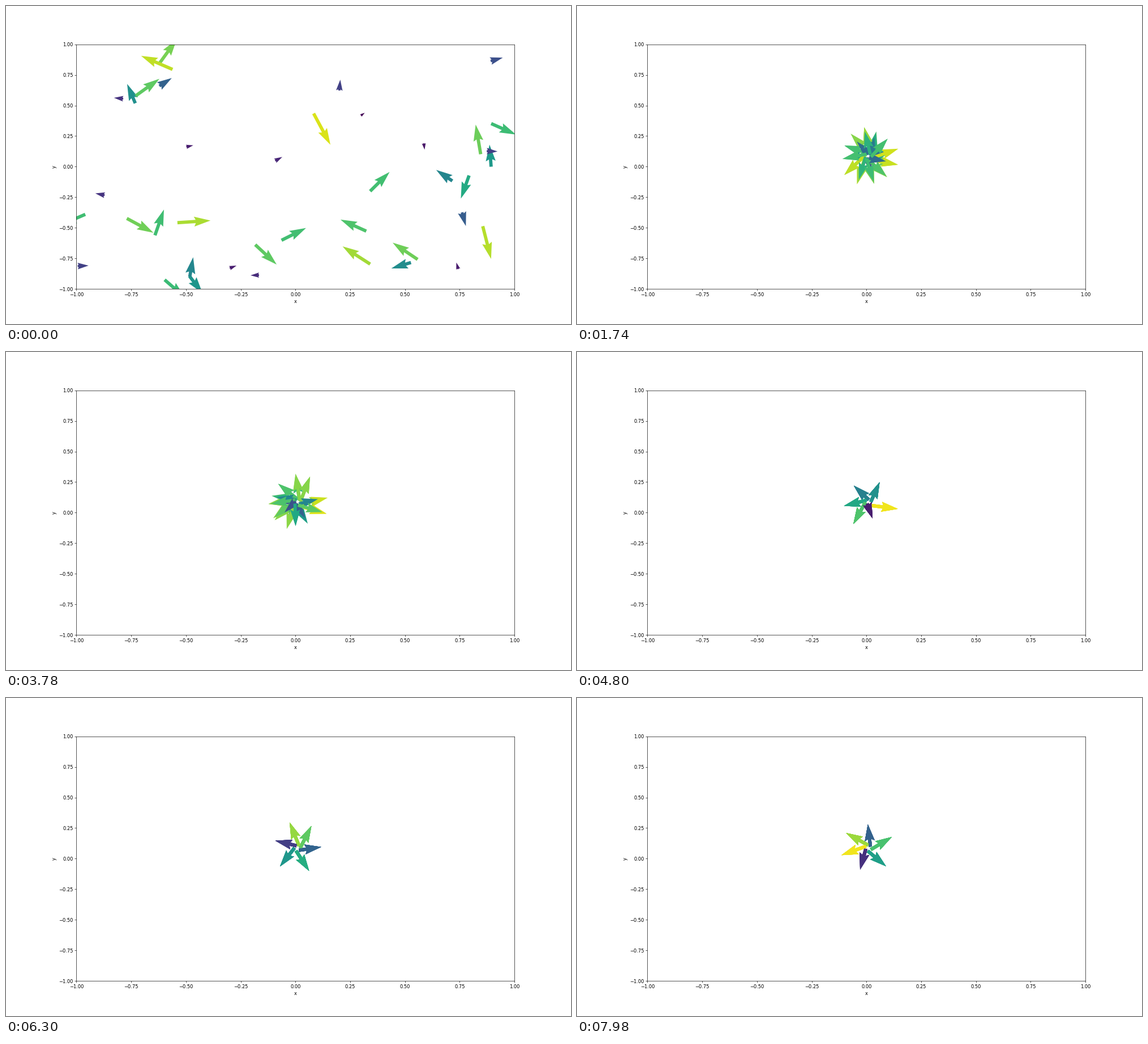
Write a matplotlib script that moves like this. It is 998 by 561 pixels and loops after 8000 ms.

```python
import numpy as np
import matplotlib.pyplot as plt
from matplotlib.animation import FuncAnimation

W, H, DPI = 998, 561, 60
LEFT, RIGHT, TOP, BOTTOM = 124.4, 898.2, 67.6, 499.3
AX_W, AX_H = RIGHT - LEFT, BOTTOM - TOP
CX, CY = 514.5, 265.0            # point the swarm circles around
N, ARMS = 40, 6
ARM = 2 * np.pi / ARMS           # spacing of the arms and turn per step
GATHER = 13                      # steps needed to reach the centre

# step: (drift, wobble, wobble phase) in degrees, shade of each arm
POSES = {
    29: ((-5, 4, 90), (.93, .70, .85, .70, .90, .80)),
    42: ((4, 10, -40), (.65, .75, .88, .88, .93, .94)),
    63: ((6, 25, -30), (.95, .82, .72, .83, .83, .60)),
    80: ((-2, 14, -50), (.98, .50, .43, .60, .72, .08)),
    105: ((-8, 11, 90), (.32, .75, .84, .18, .53, .62)),
    133: ((20, 11, 30), (.71, .31, .85, .98, .14, .56)),
}
steps = list(POSES)
bends = np.radians([bend for bend, _ in POSES.values()])
shades = np.array([np.roll(s, -k) for k, (_, s) in POSES.items()])

rng = np.random.default_rng(12)
tails = (rng.uniform(LEFT, RIGHT, N) - CX
         + 1j * (CY - rng.uniform(TOP, BOTTOM, N)))
speed = rng.uniform(8, 66, N)
first_arrow = speed * np.exp(2j * np.pi * rng.random(N))
first_shade = (speed - 8) / 58

index = np.arange(N)
arm = index % ARMS
side = np.where(index // ARMS % 2, 1, -1)
slow = rng.random(N) ** 4


def between(n, columns):
    return np.array([np.interp(n, steps, c) for c in columns.T])


def orbit(n):
    """Tail, arrow and shade of every particle while circling."""
    early = np.clip((80 - n) / 17, 0, 1)
    drift, wobble, phase = between(n, bends)
    phi = ARM * (arm + n)
    phi = phi + drift + wobble * np.sin(phi + phase)
    phi += side * np.radians(15) * early
    shade = between(n, shades)[arm] - 0.6 * early * slow
    contrast = 10 + 28 * np.clip((105 - n) / 42, 0, 1)
    r = 46 + contrast * (shade - 0.7)
    tail = 0.11 * r * np.exp(1j * (phi - 0.95))
    return tail, r * np.exp(1j * phi) - tail, shade


def state(n):
    tail, arrow, shade = orbit(n)
    if n >= GATHER:
        return tail, arrow, shade
    far = (1 - n / GATHER) ** 2
    turn = min(n / 4, 1)
    a = np.clip((n - 6) / 7, 0, 1)
    a = a * a * (3 - 2 * a)
    pull = -45 * tails / abs(tails)
    inward = (1 - turn) * first_arrow + turn * pull
    return (far * tails + (1 - far) * tail,
            (1 - a) * inward + a * arrow,
            (1 - a) * first_shade + a * shade)


fig, ax = plt.subplots(figsize=(W / DPI, H / DPI), dpi=DPI)
fig.subplots_adjust(left=LEFT / W, right=RIGHT / W,
                    top=1 - TOP / H, bottom=1 - BOTTOM / H)
ax.set(xlim=(-1, 1), ylim=(-1, 1), xlabel="x", ylabel="y")
quiver = ax.quiver(np.zeros(N), np.zeros(N), np.ones(N), np.ones(N),
                   np.zeros(N), cmap="viridis", clim=(0, 1), angles="uv",
                   scale=1, scale_units="width", units="width", width=0.0075)


def draw(i):
    tail, arrow, shade = state((2 * i + 1) // 3)   # a new pose every 60 ms
    x = (CX + tail.real - LEFT) / AX_W * 2 - 1
    y = (BOTTOM - CY + tail.imag) / AX_H * 2 - 1
    quiver.set_offsets(np.column_stack([x, y]))
    quiver.set_UVC(arrow.real / AX_W, arrow.imag / AX_W, shade)
    return quiver,


anim = FuncAnimation(fig, draw, frames=200, interval=40, repeat=True,
                     repeat_delay=0, init_func=lambda: draw(0))
plt.show()
```
